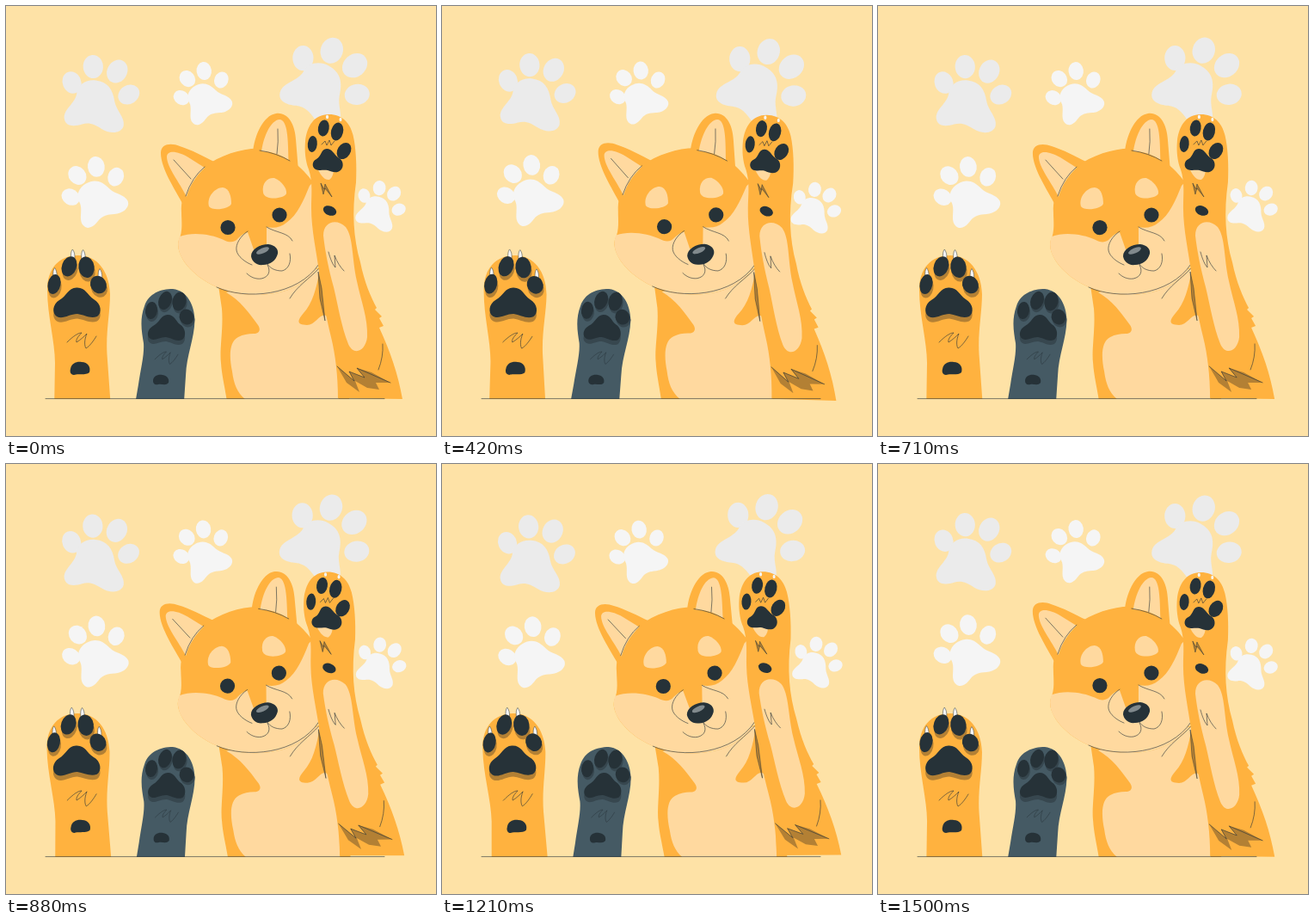
An HTML page for the animation above (1540 ms loop, 500 by 500 pixels).

```html
<!DOCTYPE html>
<html lang="en">
<head>
<meta charset="utf-8">
<title>Waving paws</title>
<style>
html, body { margin: 0; width: 100%; height: 100%; overflow: hidden; background: #fee2a6; }
svg { display: block; width: 100vw; height: 100vh; }
.orange { fill: #ffb23f; }
.cream { fill: #ffd99f; }
.dark { fill: #263238; }
.brown { fill: #b38034; }
.slate { fill: #455a64; }
.shade { fill: #37474f; }
.line { fill: none; stroke: #263238; stroke-width: .6; stroke-linecap: round; stroke-linejoin: round; }
</style>
</head>
<body>
<svg viewBox="0 0 500 500">
  <defs>
    <clipPath id="floor"><path d="M0 0H500V457H0Z"/></clipPath>
    <g id="print">
      <g transform="translate(-103 -110)">
        <ellipse cx="76.3" cy="89" rx="10.8" ry="13" transform="rotate(-22 76.3 89)"/>
        <ellipse cx="101" cy="70.5" rx="11.6" ry="13.6" transform="rotate(-4 101 70.5)"/>
        <ellipse cx="129" cy="76" rx="11.6" ry="14" transform="rotate(28 129 76)"/>
        <ellipse cx="142.5" cy="103" rx="13" ry="10.8" transform="rotate(-32 142.5 103)"/>
        <path d="M104 86.5C94 85 83 91 82 101C81 113 66 120 67.5 131C69 141 80 140 88 137.5C97 135 103 138 111 143C120 149 134 149 136.5 139C138 129 128 122 126 111C124 97 118 88 104 86.5Z"/>
      </g>
    </g>
    <path id="claw" d="M-2.2 5C-2.6 0 -2 -4 -.4 -5.5C1.4 -3 2.4 0 2.2 5Z" fill="#f5f5f5" stroke="#263238" stroke-width=".5"/>
    <path id="fur" class="line" d="M71 391C78 384 84 380 88 380C84 384 81 388 82 391C87 388 91 384 94 381C91 388 91 395 93 398C97 396 102 389 105 384"/>
    <path id="padL" d="M82 327.5C93 327 94 336 102 341C111 346 112 357 106 361C98 364 91 359 83 358C74 358 66 365 59 361C53 357 54 347 62 342C71 337 72 328 82 327.5Z"/>
    <g id="toesL">
      <ellipse cx="73.5" cy="302.8" rx="8.5" ry="12" transform="rotate(20 73.5 302.8)"/>
      <ellipse cx="93.5" cy="303.8" rx="9.2" ry="12.3" transform="rotate(-8 93.5 303.8)"/>
      <ellipse cx="56" cy="323.5" rx="7.4" ry="11.6" transform="rotate(12 56 323.5)"/>
      <ellipse cx="107.5" cy="324" rx="9.2" ry="10.6" transform="rotate(-30 107.5 324)"/>
    </g>
    <g id="toesD">
      <ellipse cx="169" cy="354" rx="7" ry="10" transform="rotate(8 169 354)"/>
      <ellipse cx="185" cy="342.5" rx="7.5" ry="11" transform="rotate(20 185 342.5)"/>
      <ellipse cx="201.5" cy="343.5" rx="8" ry="11" transform="rotate(12 201.5 343.5)"/>
      <ellipse cx="210" cy="361.5" rx="8.3" ry="9" transform="rotate(-25 210 361.5)"/>
    </g>
    <path id="padD" d="M188 359C196 359 197 366 202 370C209 374 210 384 205 388C198 391 193 386 186 385C178 385 173 390 168 387C163 384 164 376 171 372C179 368 180 359 188 359Z"/>
  </defs>

  <rect width="500" height="500" fill="#fee2a6"/>
  <g fill="#ebebeb">
    <g id="printA"><use href="#print" transform="translate(103.3 110)"/></g>
    <g id="printB"><use href="#print" transform="translate(364.3 93.6) rotate(22) scale(1.12)"/></g>
  </g>
  <g fill="#f5f5f5">
    <g id="printC"><use href="#print" transform="translate(229.5 107.6) rotate(-36) scale(.75)"/></g>
    <g id="printD"><use href="#print" transform="translate(104 223.2) rotate(-36) scale(.85)"/></g>
    <g id="printE"><use href="#print" transform="translate(431 236.7) rotate(10) scale(.64)"/></g>
  </g>

  <g clip-path="url(#floor)">
    <g id="armL">
      <path class="orange" d="M56 475L57 415C57 390 48 360 48 330C48 305 62 290 84 290C106 290 120 308 121 335C121 357 116 378 117.5 405L122.5 475Z"/>
      <use href="#toesL" class="brown" x="1" y="4.5"/>
      <use href="#padL" class="brown" y="5.5"/>
      <use href="#claw" x="77.8" y="288.5"/>
      <use href="#claw" x="90" y="289"/>
      <use href="#claw" x="57" y="310"/>
      <use href="#claw" x="109.5" y="311"/>
      <use href="#toesL" class="dark"/>
      <use href="#padL" class="dark"/>
      <use href="#fur"/>
      <path class="dark" d="M75 422C76 415 83 413 88 414C95 414 99 420 97 426C93 430 83 427 79 429C75 429 74 425 75 422Z"/>
    </g>
    <g id="armD">
      <path class="slate" d="M148 475L154 440C157 420 161 405 160 392C158 380 155 365 161 349C166 334 180 329 194 329C211 331 219 348 219.5 365C219 388 210 405 209 430L206 475Z"/>
      <use href="#toesD" class="shade" x="1" y="3"/>
      <use href="#padD" class="shade" y="5"/>
      <use href="#toesD" class="dark"/>
      <use href="#padD" class="dark"/>
      <use href="#fur" transform="translate(117 98) scale(.79 .8)"/>
      <path class="dark" d="M171 436C171 430 177 428 182 429C188 430 190 434 189 438C186 442 181 439 177 440C173 441 171 439 171 436Z"/>
    </g>
  </g>

  <g clip-path="url(#floor)">
    <g id="dog">
      <path class="orange" d="M247 325L251 352C253 375 248 400 250 415C251 432 256 448 259 475H400L390 300Z"/>
      <path class="cream" d="M256 333C272 342 283 357 293 371C297 377 294 381 288 381C281 381 276 382 270 385C260 390 259 406 263 425C265 440 269 450 279 458V475H387L386 395C385 380 380 366 372 360C365 357 360 371 350 371C338 371 338 366 346 357C356 346 361 330 365 305Z"/>
      <path class="orange" d="M206 231C197 214 180 189 180 171C180 160 192 159 202 163C215 167 230 175 242 181Z"/>
      <path class="orange" d="M287 172C288 152 299 127 314 125C328 123 336 138 337 155L340 192Z"/>
      <path class="orange" d="M201 272C206 262 204 250 204 240C203 215 215 200 231 187C250 172 280 164 298 166C325 170 345 188 357 205L362 270L364 300C350 328 318 336 290 336C250 335 222 318 207 297C200 285 199 278 201 272Z"/>
      <path class="cream" d="M202 268C218 262 240 266 252 271.5C260 276 266 275 270 270C273 267 277 264 281 263L288 283L303 277L303 257C312 259 320 257 326 252C339 243 346 226 353 209L357 205L362 270L364 300C350 328 318 336 290 336C250 335 222 318 207 297C199 285 199 275 202 268Z"/>
      <path class="cream" d="M210 222C202 205 187 188 187 175C188 167 200 169 212 176L231 188C221 198 214 208 210 222Z"/>
      <path class="cream" d="M297 169C300 150 308 133 318 132C328 132 328 158 328.5 179C318 172 307 169 297 169Z"/>
      <path class="cream" d="M236 233C233 222 243 211 252 211C260 212 262 222 262 230C260 236 240 239 236 233Z"/>
      <path class="cream" d="M299 217C297 205 305 199 312 200C320 203 327 212 326 218C324 224 301 227 299 217Z"/>
      <circle class="dark" cx="258" cy="257.5" r="8.6"/>
      <circle class="dark" cx="318" cy="243" r="8.6"/>
      <path class="line" d="M231 187Q216 199 209 221M195 179L215 201M295 168Q315 171 330 180M316 143Q317 158 315 172"/>
      <path class="line" d="M281 262C272 268 267 277 268 284C269 291 278 298 286 301M303 257C314 264 328 263 333 273M330 288C332 297 329 306 321 308C313 308 307 305 304 300M304 301C308 308 306 315 297 317C290 318 284 315 280 311"/>
      <path class="line" d="M245 327C278 342 339 338 364 300M330 340C339 325 352 318 364 305"/>
      <path class="dark" d="M285 291C285 283 295 277 305 277C313 278 317 283 316 288C314 296 307 301 299 301C291 302 286 297 285 291Z"/>
      <ellipse cx="298.5" cy="284.5" rx="8" ry="3" transform="rotate(-24 298.5 284.5)" fill="#818a8d"/>
    </g>
  </g>

  <g id="armR">
    <path class="orange" d="M386 456C386 430 383 405 378 385C372 360 367 335 365 315C361 285 355 260 355 235C355 220 357 205 352 190C348 180 347 168 348 157C350 140 358 126 375.5 126C391 126 400 136 403.5 150C407 165 408 185 407 205C402 240 404 270 412 298C417 322 424 338 431 351L429 353L437 361L434 363L439 372L434 374C447 402 456 428 461 457Z"/>
    <path class="cream" d="M369 267C369 250 385 247 395 257C404 269 402 293 408 320C413 344 421 363 420 385C418 402 404 407 398 393C390 373 386 348 381 327C375 305 371 285 369 267Z"/>
    <path class="cream" d="M361 186C365 196 370 203 376 202C380 199 381 194 381 188Z"/>
    <ellipse cx="373.5" cy="129" rx="1.6" ry="2.2" fill="#f5f5f5"/>
    <ellipse cx="389" cy="132" rx="1.5" ry="2.2" fill="#f5f5f5"/>
    <g class="dark">
      <ellipse cx="369.3" cy="142" rx="6.4" ry="9.6" transform="rotate(10 369.3 142)"/>
      <ellipse cx="385" cy="146" rx="7" ry="10.6" transform="rotate(14 385 146)"/>
      <ellipse cx="356.3" cy="160.5" rx="5.5" ry="9.6" transform="rotate(5 356.3 160.5)"/>
      <ellipse cx="393" cy="168.5" rx="7.6" ry="10.2" transform="rotate(32 393 168.5)"/>
      <path d="M373 166C379 166 381 172 386 176C393 179 393 188 389 191C385 195 379 193 374 191C369 190 365 192 360 190C355 187 356 180 361 178C367 175 366 166 373 166Z"/>
      <ellipse cx="376.5" cy="238" rx="8" ry="5.4" transform="rotate(22 376.5 238)"/>
    </g>
    <path class="line" d="M367 161L371 157L373 162L376 156L378 162L382 157M375 286C377 294 380 301 383 304L382 290C385 298 389 304 393 308M438 393Q439 408 433 423"/>
    <path class="brown" stroke="#263238" stroke-width=".5" d="M366 206L369 219L371 212L379 222L371 207L370 213Z"/>
    <path class="brown" stroke="#263238" stroke-width=".5" d="M363 309L365 340L371 366L367 328Z"/>
    <path class="brown" d="M385 419L396 438L411 449L406 436L420 444L434 446L430 438L447 438L425 426L408 421L417 432L399 425L405 436Z"/>
    <path class="line" d="M385 419L405 436L399 425L417 432L408 421L447 438"/>
  </g>
  <path class="line" d="M46 456.6H440"/>
</svg>
<script>
const LOOP = 1540;
// time, sway
const keys = [[0, 0], [210, -.75], [420, -1], [710, .05], [1080, 1.5], [1330, .75], [1500, .1]];
// turn, pivot x, pivot y, shift x, shift y, all per unit of sway
const parts = {
  armL: [-.8, 84, 375, 0, 0],
  armD: [-.5, 190, 350, 0, 0],
  dog: [-.7, 325, 305, 0, 0],
  armR: [-.87, 330, 285, 0, 0],
  printA: [-.5, 103, 110, -.2, 1.9],
  printB: [-.5, 365, 105, -.5, -1.2],
  printC: [-1.3, 229, 108, -.2, .5],
  printD: [0, 0, 0, .6, 1.9],
  printE: [0, 0, 0, .7, -1.8]
};
const movers = Object.entries(parts).map(([id, m]) => [document.getElementById(id), m]);

function key(i) {
  const n = keys.length, k = keys[(i + n) % n];
  return [k[0] + LOOP * Math.floor(i / n), k[1]];
}

function slope(i) {
  const a = key(i - 1), b = key(i + 1);
  return (b[1] - a[1]) / (b[0] - a[0]);
}

// smooth periodic curve through the keys
function sway(t) {
  let i = keys.length - 1;
  while (keys[i][0] > t) i--;
  const [t0, a] = key(i), [t1, b] = key(i + 1);
  const d = t1 - t0, s = (t - t0) / d, r = 1 - s;
  return a * r * r * (1 + 2 * s) + b * s * s * (1 + 2 * r)
    + d * s * r * (slope(i) * r - slope(i + 1) * s);
}

function draw(t) {
  const u = sway(t);
  for (const [el, [turn, px, py, dx, dy]] of movers)
    el.setAttribute("transform", `translate(${dx * u} ${dy * u}) rotate(${turn * u} ${px} ${py})`);
}

const start = performance.now();
function tick() {
  draw((performance.now() - start) % LOOP);
  requestAnimationFrame(tick);
}
tick();
</script>
</body>
</html>
```
